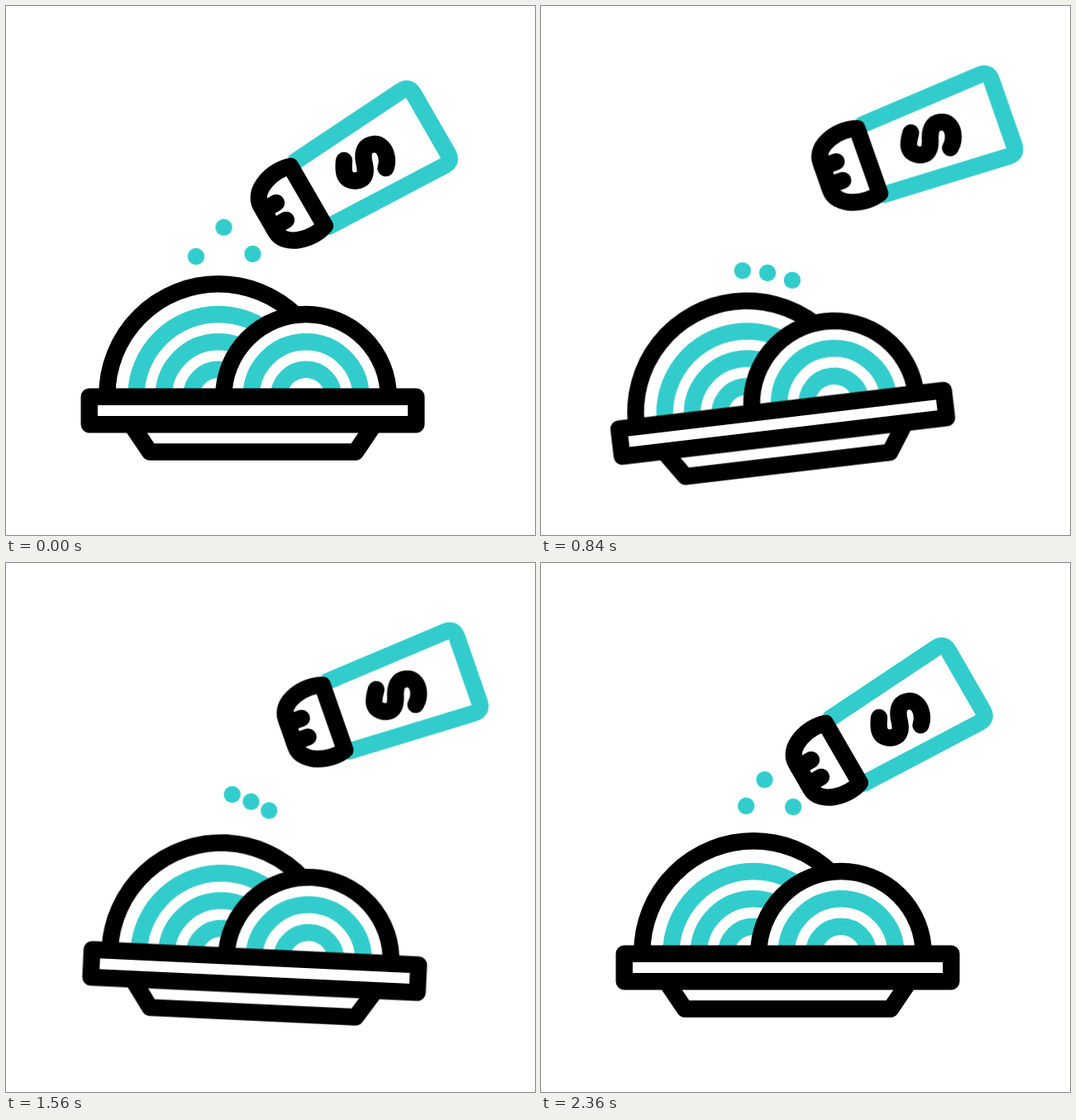
Animation, 640 px wide and 640 px high, one loop 2.4 s. Source, as an HTML page without scripts:

```html
<!DOCTYPE html>
<html lang="en">
<head>
<meta charset="utf-8">
<title>Seasoning a dish</title>
<style>
  html, body { margin: 0; width: 100%; height: 100%; overflow: hidden; background: #fff; }
  svg { display: block; width: 100%; height: 100%; }

  .line { fill: none; stroke: #000; stroke-width: 20.4; stroke-linecap: round; stroke-linejoin: round; }
  .teal { stroke: #3cc; }
  .solid { fill: #fff; }
  .rings { stroke-linecap: butt; }

  .shaker, .dish, .dots circle {
    animation: 2400ms cubic-bezier(.333, 0, .667, 1) infinite;
  }
  .shaker { transform-origin: 439px 186.5px; animation-name: shake; }
  .dish { transform-origin: 299px 540px; animation-name: rock, sink; }

  /* Five shakes with a short rest at both ends */
  @keyframes shake {
    0%, 8.333%, 25%, 41.667%, 58.333%, 75%, 91.667%, 100% { transform: none; }
    16.667%, 33.333%, 50%, 66.667%, 83.333% { transform: translate(42.6px, -31.5px) rotate(12deg); }
  }
  @keyframes rock {
    0%, 12.5% { rotate: 0deg; }
    35.833% { rotate: -6.8deg; }
    52.5% { rotate: 5.7deg; }
    76.667%, 100% { rotate: 0deg; }
  }
  @keyframes sink {
    0%, 14.167% { translate: 0 0; }
    35% { translate: 0 15px; }
    52.083% { translate: 0 15.5px; }
    71.667%, 100% { translate: 0 0; }
  }

  /* Each grain flies from --from to --to, then vanishes */
  .dots circle {
    r: 10.2px;
    fill: #3cc;
    animation-name: fall;
    animation-timing-function: cubic-bezier(.333, .667, .667, 1);
    animation-delay: var(--delay);
  }
  .dots circle:nth-child(1) { --from: 340px, 215px; }
  .dots circle:nth-child(2) { --from: 348px, 232px; }
  .dots circle:nth-child(3) { --from: 344px, 248px; }
  .dots .last circle { animation-name: toss; }
  .last circle:nth-child(1) { --from: 394px, 221px; }
  .last circle:nth-child(2) { --from: 326px, 217px; }
  .last circle:nth-child(3) { --from: 359px, 256px; }

  @keyframes fall {
    0% { transform: translate(var(--from)); opacity: 1; }
    12.5% { transform: translate(var(--to)); opacity: 1; }
    12.51%, 100% { transform: translate(var(--to)); opacity: 0; }
  }
  @keyframes toss {
    0% { transform: translate(var(--from)); opacity: 1; }
    7.917% { transform: translate(var(--to)); opacity: 1; }
    8.4% { transform: translate(var(--to)); opacity: 1; }
    8.41%, 100% { transform: translate(var(--to)); opacity: 0; }
  }
</style>
</head>
<body>
<svg viewBox="0 0 640 640">
  <g class="dots">
    <g style="--delay: -1760ms">
      <circle style="--to: 232px, 333px"/>
      <circle style="--to: 265px, 334px"/>
      <circle style="--to: 299px, 342px"/>
    </g>
    <g style="--delay: -1360ms">
      <circle style="--to: 231px, 324px"/>
      <circle style="--to: 265px, 324px"/>
      <circle style="--to: 301px, 331px"/>
    </g>
    <g style="--delay: -960ms">
      <circle style="--to: 237px, 316px"/>
      <circle style="--to: 268px, 320px"/>
      <circle style="--to: 304px, 328px"/>
    </g>
    <g style="--delay: -560ms">
      <circle style="--to: 237px, 316px"/>
      <circle style="--to: 268px, 320px"/>
      <circle style="--to: 304px, 328px"/>
    </g>
    <g class="last" style="--delay: -160ms">
      <circle style="--to: 226px, 305px"/>
      <circle style="--to: 262px, 269px"/>
      <circle style="--to: 297px, 301px"/>
    </g>
  </g>

  <g class="dish line">
    <path class="solid" d="M122.3 472.7V471A134.7 134.7 0 0 1 391.7 471V472.7"/>
    <path class="teal rings" d="M157.3 472.7a99.7 99.7 0 0 1 199.4 0M190.6 472.7a66.4 66.4 0 0 1 132.8 0M224 472.7a33 33 0 0 1 66 0"/>
    <path class="solid" d="M263.3 472.7a99.7 99.7 0 0 1 199.4 0"/>
    <path class="teal rings" d="M296.6 472.7a66.4 66.4 0 0 1 132.8 0M330 472.7a33 33 0 0 1 66 0"/>
    <path class="solid" d="M151.5 506.3L174 539.5H423L445.5 506.3"/>
    <path class="solid" d="M100.7 472.7H496.3V506.3H100.7Z"/>
  </g>

  <g class="shaker line">
    <path class="teal" d="M350 188L478.3 102.5Q487.4 96.5 492.8 105.9L534.8 178.9Q540.1 188.1 530.7 193L391 266.5"/>
    <path d="M409 187C408 198 407 212 424 211.5C438 209 435 196 433 188C431 176 434 168 446 167C460 168 463 186 459.5 196"/>
    <g transform="translate(365 230) rotate(150)">
      <path d="M0 41.5C20 49 55 40 55 18V-18C55 -40 20 -49 0 -41.5Z"/>
      <path d="M55 12H37M55 -12H37"/>
    </g>
  </g>
</svg>
</body>
</html>
```
